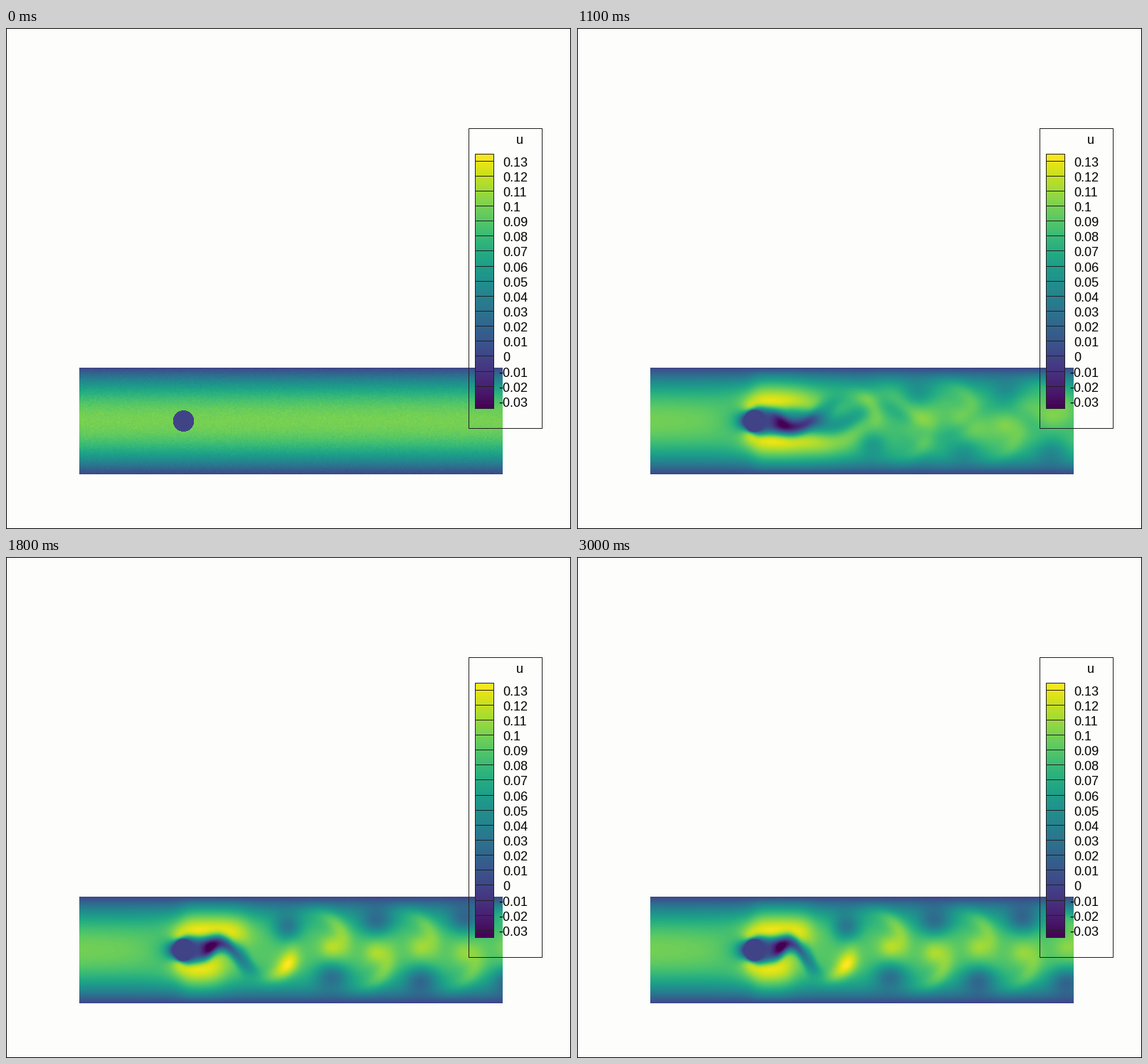
Write a matplotlib script that moves like this. It is 794 px wide and 705 px high and loops after 3.1 s.

```python
import numpy as np
import matplotlib.pyplot as plt
from matplotlib.animation import FuncAnimation
from matplotlib.patches import Rectangle

W, H, DPI = 794, 705, 100
FRAMES, INTERVAL = 31, 100
PX = 72 / DPI                      # one pixel in points
VMIN, VMAX = -0.0347, 0.135
LEFT, RIGHT, TOP, BOTTOM = 103, 698, 478, 628
HALF = (BOTTOM - TOP) / 2
CYL_X, CYL_R = 249.5, 15
SHED = 14                          # frame at which shedding is regular
INK = "#222222"

x = np.arange(LEFT, RIGHT) + 0.5
Y = (np.arange(TOP, BOTTOM) + 0.5 - (TOP + BOTTOM) / 2)[:, None]
R = np.hypot(x - CYL_X, Y)
SOLID = R < CYL_R
LAYER = 1 - np.exp(-np.maximum(R - CYL_R, 0) / 3.5)


def sigmoid(v):
    return 1 / (1 + np.exp(-np.clip(v, -40, 40)))


def smoothstep(v):
    v = np.clip(v, 0, 1)
    return v * v * (3 - 2 * v)


def bump(v, centre, size):
    return np.exp(-((v - centre) / size) ** 2)


def channel(peak, power):
    return peak * (1 - np.abs(Y / HALF) ** power)


def approach():
    """Inlet parabola with potential flow around the cylinder."""
    r = np.maximum(R, 1)
    cos2 = ((x - CYL_X) ** 2 - Y ** 2) / r ** 2
    return channel(0.1, 2) * (1 - cos2 * (16 / r) ** 2)


def add_wake(u, px, centre, speed, width, shape, strength):
    mask = (strength * smoothstep((px - 240) / 16)
            * np.exp(-(np.abs(Y - centre) / width) ** shape))
    return u * (1 - mask) + speed * mask


def young_wake(t):
    """Long wake that grows downstream and starts to meander."""
    front = 255 + 65 * t
    sway = np.exp(0.55 * min(t - 7, 0))
    cycles = (t - SHED) / 14
    near = sigmoid((350 - x) / 15)
    reach = sigmoid((front - x) / 25)

    u = channel(0.102 + 0.013 * near, 2 + reach)
    u = u + 0.024 * near * bump(np.abs(Y), 27, 19)
    size = (20 * smoothstep((x - 290) / 150)
            * (1 - 0.35 * smoothstep((x - 560) / 150)))
    centre = sway * size * np.cos(2 * np.pi * ((x - 385) / 168 + cycles))
    lobe = (0.026 * smoothstep((x - 280) / 60)
            * (1 - 0.7 * smoothstep((x - 420) / 260)))
    v = (Y - centre) / 24
    u = u + (sway * lobe * np.cos(2 * np.pi * ((x - 425) / 168 + cycles))
             * v * np.exp(0.5 - v * v / 2))

    speed = 0.055 * np.tanh((x - 370) / 65) + 6e-5 * (x - 370)
    speed = speed * smoothstep((x - 265) / 45)
    width = (15.5 + 5 * sigmoid((330 - x) / 15)
             + 0.015 * np.maximum(x - 450, 0))
    shape = 2 + 2 * sigmoid((305 - x) / 15)
    return add_wake(u, x, centre, speed, width, shape, reach)


def add_vortex(u, px, k):
    """Slow core near one wall, fast spot and crescent on its other side."""
    s = 1 if k % 2 else -1
    first = k == 0
    cx = 404 + 62.75 * k
    dx = px - cx
    low = s * (43 - 12 * np.exp(-k / 2))
    u = u - 0.048 * bump(dx, 0, 20 if first else 25) * bump(Y, low, 19)
    spot = 18 if first else -4 * s
    u = u + (0.017 if first else 0.03 - 0.003 * k) * (
        bump(dx, 0, 17) * bump(Y, spot, 16))
    radius = 38 if first else 50
    ax_, ay = dx + 31, -s * Y - (0 if first else 4)
    arc = (bump(np.hypot(ax_, ay), radius, 12)
           * bump(np.arctan2(ay, ax_), 0.8, 0.85))
    return u + (0.034 if first else 0.026 - 0.002 * k) * arc


def vortex_street(px):
    """Short curled wake followed by vortices on alternate sides."""
    lower = sigmoid(Y / 5)
    near = sigmoid((342 - 36 * lower - px) / 11)
    u = channel(0.09 + 0.025 * near, 2.6 + 0.4 * near)
    u = u + 0.025 * near * bump(np.abs(Y), 27, 19)

    centre = -9 * bump(px, 302, 18) + 36 * smoothstep((px - 312) / 60)
    speed = 0.07 * np.tanh((px - 310) / 45) - 0.015 * bump(px, 290, 10)
    speed = speed * smoothstep((px - 268) / 20)
    width = 11 + 8 * sigmoid((285 - px) / 8) + 6 * bump(px, 340, 14)
    shape = 2 + 2 * sigmoid((275 - px) / 8)
    u = add_wake(u, px, centre, speed, width, shape,
                 smoothstep((388 - px) / 45))
    for k in range(7):
        u = add_vortex(u, px, k)
    return u


def street_at(t):
    late = t - SHED
    drift = 1.33 * late + 4 * (1 - np.exp(-late / 3))
    share = (smoothstep((x - 275) / 100)
             * (1 + 0.17 * np.maximum(x - 385, 0) / 315))
    return vortex_street(x + drift * share)


def start_field():
    noise = np.random.default_rng(4).normal(0, 0.0016, (100, 400))
    rows = np.arange(BOTTOM - TOP) * 100 // (BOTTOM - TOP)
    cols = np.arange(RIGHT - LEFT) * 400 // (RIGHT - LEFT)
    return np.where(SOLID, 0, channel(0.1, 2) + noise[rows][:, cols])


def field(t):
    if t == 0:
        return start_field()
    mix = smoothstep((t - 7) / 7)
    u = 0
    if mix < 1:
        u = u + (1 - mix) * young_wake(t)
    if mix > 0:
        u = u + mix * street_at(t)
    # half a shedding period passes per frame, so the sides swap
    if (t - SHED) % 2:
        u = u[::-1]
    ahead = sigmoid((248 - x) / 6)
    return (ahead * approach() + (1 - ahead) * u) * LAYER


fig = plt.figure(figsize=(W / DPI, H / DPI), dpi=DPI, facecolor="#fdfdfc")
ax = fig.add_axes([0, 0, 1, 1])
ax.axis("off")


def show(data, extent, z):
    return ax.imshow(data, extent=extent, cmap="viridis", vmin=VMIN, vmax=VMAX,
                     interpolation="nearest", aspect="auto", zorder=z)


def outline(x0, y0, x1, y1, color=INK):
    ax.add_patch(Rectangle((x0 + 0.5, y0 + 0.5), x1 - x0, y1 - y0, fill=False,
                           ec=color, lw=PX, snap=False, zorder=4))


def label(px, py, text):
    ax.text(px, py, text, family="Liberation Sans", fontsize=18 * PX,
            va="baseline", zorder=5)


flow = show(field(0), (LEFT, RIGHT, BOTTOM, TOP), 1)
show(np.linspace(VMAX, VMIN, 359)[:, None], (659, 686, 536, 177), 2)
outline(0, 0, W - 1, H - 1, "black")
outline(650, 141, 753, 563)
outline(659, 177, 685, 535)
label(717, 163, "u")
for i in range(17):
    tick = int(187 + 21.15 * i) + 0.5
    ax.plot([659, 686], [tick, tick], color=INK, lw=PX, snap=False,
            solid_capstyle="butt", zorder=4)
    level = 13 - i
    label(698 if level >= 0 else 692, tick + 7.5, f"{level / 100:g}")
ax.set_xlim(0, W)
ax.set_ylim(H, 0)


def update(i):
    flow.set_data(field(i))
    return (flow,)


anim = FuncAnimation(fig, update, frames=FRAMES, interval=INTERVAL,
                     repeat=True, repeat_delay=0, blit=False)
plt.show()
```
